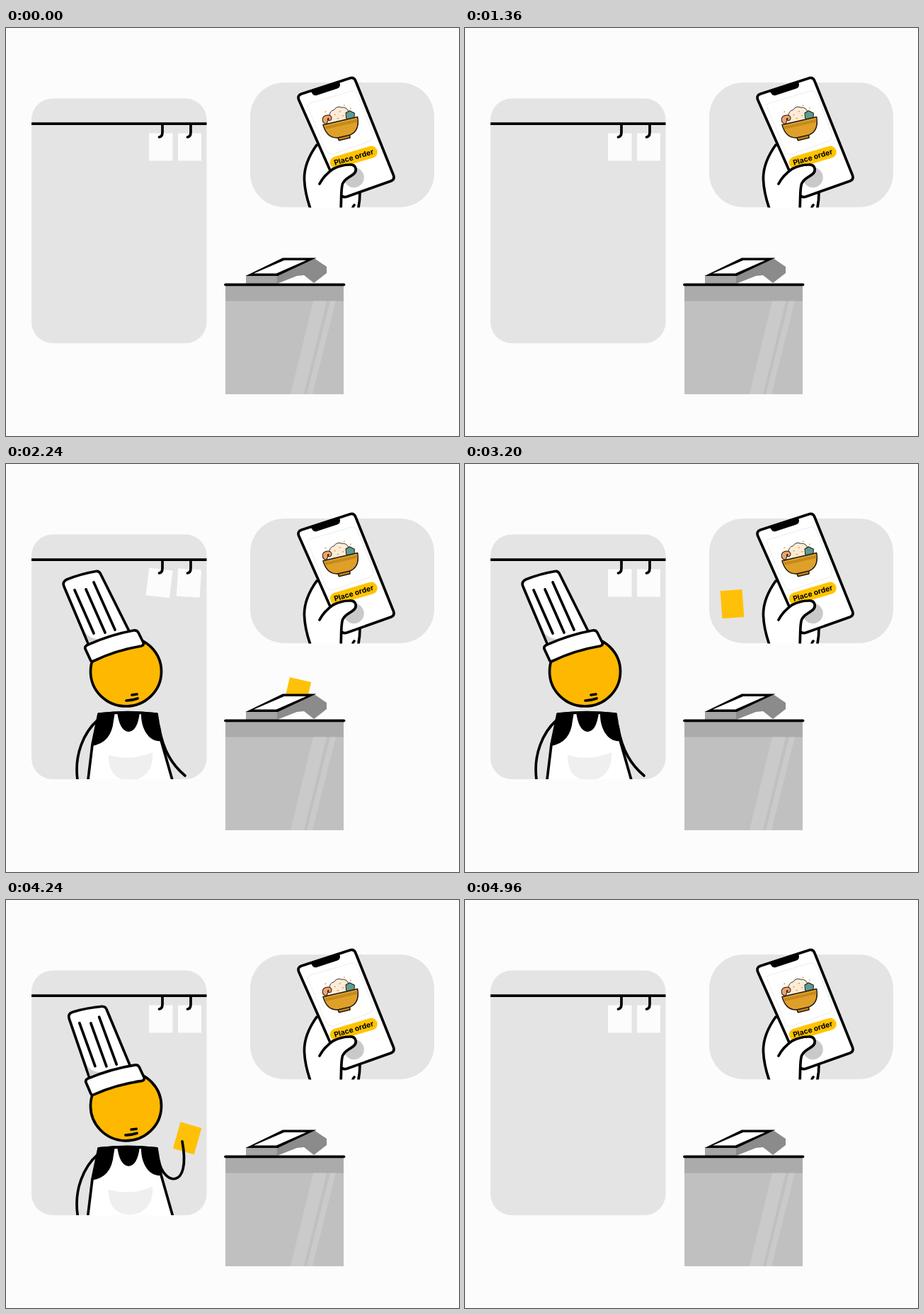
An HTML page that plays this animation: 640x576 px, repeating every 5760 ms.

```html
<!DOCTYPE html>
<html lang="en">
<head>
<meta charset="utf-8">
<title>Order to kitchen</title>
<style>
  html, body { margin: 0; width: 100%; height: 100%; overflow: hidden; background: #fcfcfc; }
  svg { display: block; width: 100%; height: 100%; }
  .ink { stroke: #000; stroke-width: 3.7; stroke-linecap: round; stroke-linejoin: round; }
  .line { fill: none; }
  .white { fill: #fff; }
  .label { font: 700 10.4px Inter, "Open Sans", sans-serif; text-anchor: middle; }
</style>
</head>
<body>
<svg viewBox="0 0 640 576">
  <defs>
    <clipPath id="orderClip"><rect x="345" y="20" width="260" height="233.5"/></clipPath>
    <clipPath id="kitchenClip"><path d="M36 60H640V445H66A30 30 0 0 1 36 415Z"/></clipPath>
    <clipPath id="screenClip"><path d="M350 346.500L393 328H424L382 346.500Z"/></clipPath>
  </defs>
  <rect width="640" height="576" fill="#fcfcfc"/>
  <rect x="36" y="99.500" width="247.500" height="345.500" rx="30" fill="#e4e4e4"/>
  <rect x="345" y="77" width="260" height="176" rx="48" fill="#e4e4e4"/>

  <!-- kitchen rail -->
  <g fill="#fcfcfc">
    <rect id="noteA" x="202" y="148.500" width="33.500" height="39"/>
    <rect id="noteB" x="243" y="148.500" width="33" height="39"/>
  </g>
  <g class="ink line">
    <path d="M36 135.200H283.500" stroke-linecap="butt"/>
    <path d="M221 137V147Q221 153.500 216.500 154M261 137V147Q261 153.500 256.500 154"/>
  </g>

  <!-- phone in hand -->
  <g clip-path="url(#orderClip)">
    <path class="ink white" d="M439 165C424 186 421 201 421.500 214C422 230 426 244 431 258H497C499 250 500 242 500 232L470 170Z"/>
    <path class="ink line" d="M489 257Q490 252 492 250"/>
    <path class="ink white" d="M417.500 93L487 70.500Q492 69.500 494 75L547.500 208Q549.500 214 544 216L482 238Q476 240 473.500 236L413.500 101Q411.500 95 417.500 93Z"/>
    <path d="M430 88.500L433 93Q435 96 439 95L468 85.500Q472 84 472 80L471 75Z"/>
    <path fill="none" stroke="#ececec" d="M430 106L488 89Q494 88 497 95L518 148Q520 157 513 160L462 178Q455 179 452 173L427 113Q425 108 430 106Z"/>
    <g transform="translate(472.500 132) rotate(-13)" stroke="#1f1710" stroke-width="1.500" stroke-linejoin="round">
      <path fill="#fdebd8" stroke-width=".8" d="M-20 0Q-21 -8 -14 -10Q-12 -18 -5 -18Q0 -23 6 -19Q13 -18 14 -12Q21 -9 20 0Z"/>
      <path fill="#f0a266" stroke-width="1" d="M-20 -1C-27 -4 -25 -14 -16 -13C-9 -12 -10 -4 -15 -5C-19 -6 -16 -9 -15 -8Z"/>
      <path fill="#5d9b92" stroke-width="1" d="M9 -3L10 -10L16 -12L22 -7L20 0L12 1Z"/>
      <path fill="none" stroke="#e6a23c" stroke-linecap="round" d="M-6 -11h1M2 -14h1M5 -7h1M-3 -5h1M-18 -18h1M10 -21h.5M18 -15h.5"/>
      <path fill="#c98714" d="M-9 19H9L8 25.500H-8Z"/>
      <path fill="#dfa02a" d="M-25 -1H25Q24 19 9 21.500H-9Q-24 19 -25 -1Z"/>
      <path fill="#c58a1c" stroke="none" d="M-24 2H24L23 6H-23Z"/>
    </g>
    <g transform="translate(491.300 182.500) rotate(-16.500)">
      <rect x="-34.500" y="-8.500" width="69" height="17" rx="8.500" fill="#ffc400"/>
      <rect id="dim" x="-34.500" y="-8.500" width="69" height="17" rx="8.500"/>
      <text class="label" y="3.500">Place order</text>
    </g>
    <circle id="shade" fill="#c9c9c9"/>
    <path id="thumb" class="ink white"/>
  </g>
  <path id="rays" class="line" stroke="#ffb90f" stroke-width="3.200" stroke-linecap="round"/>

  <!-- cook and ticket -->
  <g clip-path="url(#kitchenClip)">
    <rect id="ticket" x="-15.500" y="-20" width="31" fill="#ffc107"/>
    <g id="cook">
      <path id="arm" class="ink line"/>
      <path class="ink line" d="M129 362C112 377 94 410 102 452"/>
      <path class="ink white" d="M131 353L122 396L114 462H239.500L219 390L213 353Q172 349 131 353Z"/>
      <path d="M131 352Q142 350 154 350.500L152 362Q149 394 121 398ZM157 350H189C187 369 181 378 173 378C164 377 159 366 157 350ZM191 350.500Q204 351 213 353L219 391C203 393 190 375 191 350.500Z"/>
      <path class="ink line" d="M131 353Q172 348 213 353"/>
      <path fill="#efefef" d="M145 411Q176 420 207 407C209 432 194 446 176 446.500C156 447 144 434 145 411Z"/>
      <g id="head">
        <ellipse class="ink" cx="169.500" cy="293" rx="50" ry="49" fill="#ffb800"/>
        <path class="ink line" d="M178 326L185 325M170 334Q178 334 186 331"/>
        <g id="hat">
          <path class="ink white" d="M118 258L82 173Q79 166 86 163Q106 155 127 151.500Q132 151 134 156L176 240Z"/>
          <path fill="#d2d2d2" d="M111 236Q118 248 132 247L118 254Z"/>
          <path class="ink line" d="M97 178L124 239M113 177L140 238M124 167L154 234"/>
        </g>
        <path class="ink white" d="M114 256Q147 241 180 235Q185 234 187 238L194 252Q195 256 191 257Q155 263 124 278Q120 280 119 276L112 261Q111 258 114 256Z"/>
      </g>
    </g>
  </g>

  <!-- till -->
  <path fill="#8b8b8b" d="M383 350L436 325.500L453 337V346L435 360L421 349L411 350L383 361Z"/>
  <path fill="#a5a5a5" d="M339 349H383V361H339Z"/>
  <path d="M338.500 350L391 324.500H438.500L384 350Z"/>
  <g clip-path="url(#screenClip)">
    <rect class="white" x="340" y="325" width="100" height="25"/>
    <path id="sheen" fill="#b5b5b5" d="M0 350L50 325H66L16 350Z"/>
  </g>
  <rect x="310" y="362" width="167" height="155" fill="#c0c0c0"/>
  <rect x="310" y="362" width="167" height="23.500" fill="#ababab"/>
  <path fill="#cacaca" d="M434 385.500H453L421 517H402ZM458 385.500H466L433 517H425Z"/>
  <path class="ink" d="M310 362.300H477.500"/>
  <g id="marks" fill="#3b3b40" stroke="#3b3b40" stroke-width="2.500" stroke-linejoin="round">
    <path d="M438.500 294L449 299L436 308Z"/>
    <path d="M456 311L460.500 317L447 320.500Z"/>
  </g>
</svg>
<script>
const LOOP = 5760, STEP = 80;
const $ = id => document.getElementById(id);
const set = (id, attrs) => { for (const k in attrs) $(id).setAttribute(k, attrs[k]); };
const mix = (a, b, u) => a + (b - a) * u;
const show = on => on ? "visible" : "hidden";

// Timing: linear progress, eased progress, a single swell.
const part = (t, a, b) => Math.min(1, Math.max(0, (t - a) / (b - a)));
const ease = (t, a, b) => { const u = part(t, a, b); return u * u * (3 - 2 * u); };
const pulse = (t, a, b) => Math.sin(Math.PI * part(t, a, b));

function drawPhone(t) {
  const p = ease(t, 40, 360) - ease(t, 840, 1160);
  const grow = ease(t, 240, 600) - ease(t, 840, 1120);
  set("thumb", {
    d: `M443 220C447 212 455 204 462 ${199 - 2 * p}
      C468 ${196 - 6 * p} 478 ${193 - 13 * p} ${485 - 4 * p} ${193 - 14 * p}
      C${495 + 2 * p} ${192 - 16 * p} ${497 + 3 * p} ${202 - 10 * p} ${490 + 3 * p} ${207 - 10 * p}
      C${485 + 2 * p} ${211 - 5 * p} 479 ${212 + p} 475.500 220C473 228 474 240 473 258`
  });
  set("shade", { cx: 491.5 - 8 * p, cy: 211 - 15 * p, r: 14.3 - 7 * p });
  set("dim", { opacity: 0.13 * p });

  let rays = "";
  for (let i = 0; i < 5; i++) {
    const a = (13 + 25.7 * i) * Math.PI / 180;
    const at = k => `${457 - 57 * k * Math.cos(a)} ${92 - 50 * k * Math.sin(a)}`;
    rays += `M${at(1)}L${at(1 + 0.24 * grow)}`;
  }
  set("rays", { d: rays, visibility: show(grow > 0) });
}

function drawNotes(t) {
  const u = part(t, 4400, 4960);
  const swing = Math.sin(2 * Math.PI * u) * (1 - u);
  const enter = pulse(t, 2080, 2400);
  set("noteA", { transform: `rotate(${7 * enter + 4.5 * swing} 219 150)` });
  set("noteB", { transform: `rotate(${3.5 * enter + 2.5 * swing} 259 150)` });
}

// Rises out of the till, is tossed up, then falls into the hand.
function ticketPose(t) {
  if (t < 2800) {
    const left = (1 - part(t, 2080, 2400)) ** 2;
    return { x: 417 - 22 * left, y: 312 + 48 * left, turn: 13, height: 39 - 26 * left };
  }
  const up = part(t, 2800, 3600), down = part(t, 3600, 4080), drop = down ** 1.65;
  return {
    x: 417 - 79 * up - 82 * drop,
    y: 312 - 161 * Math.sin(up * Math.PI / 2) + 188 * drop,
    turn: 13 - 34 * up + 37 * down ** 4,
    height: 39
  };
}

function drawCook(t) {
  const enter = pulse(t, 1440, 2080), leave = pulse(t, 4160, 4720);
  const x = -225 * (1 - part(t, 1440, 2080)) ** 1.6 - 280 * part(t, 4160, 4720) ** 5;
  const y = -10 * enter - 5 * leave;
  const sway = leave - enter + 0.5 * pulse(t, 2080, 2240);
  set("cook", { transform: `translate(${x} ${y})` });
  set("head", { transform: `rotate(${3.5 * sway} 170 293)` });
  set("hat", {
    transform: `translate(148 247) scale(1 ${1 - 0.07 * Math.max(0, sway)}) rotate(${7 * sway}) translate(-148 -247)`
  });

  // Forearm control point and hand: hanging, reaching out, holding.
  const hang = [235, 425, 253, 440], out = [280, 410, 290, 361], grip = [262, 412, 249, 343];
  const reach = ease(t, 3440, 3800), hold = ease(t, 3880, 4080);
  const hand = hang.map((v, i) => mix(mix(v, out[i], reach), grip[i], hold));
  set("arm", { d: `M216 370C222 405 ${hand.join(" ")}` });

  const pose = ticketPose(t), held = t >= 4080;
  set("ticket", {
    transform: `translate(${pose.x + held * x} ${pose.y + held * y}) rotate(${pose.turn})`,
    height: pose.height,
    visibility: show(t > 2080 && t < 4720)
  });
}

function drawTill(t) {
  const s = ease(t, 1360, 1600) - ease(t, 1880, 2080);
  set("marks", {
    transform: `translate(434 324) scale(${s}) translate(-434 -324)`,
    visibility: show(s > 0)
  });
  set("sheen", { transform: `translate(${mix(270, 400, part(t, 1520, 2000))} 0)` });
}

const start = performance.now();
function frame() {
  const elapsed = (performance.now() - start) % LOOP;
  const t = Math.floor(elapsed / STEP) * STEP;
  [drawPhone, drawNotes, drawCook, drawTill].forEach(draw => draw(t));
  requestAnimationFrame(frame);
}
frame();
</script>
</body>
</html>
```
